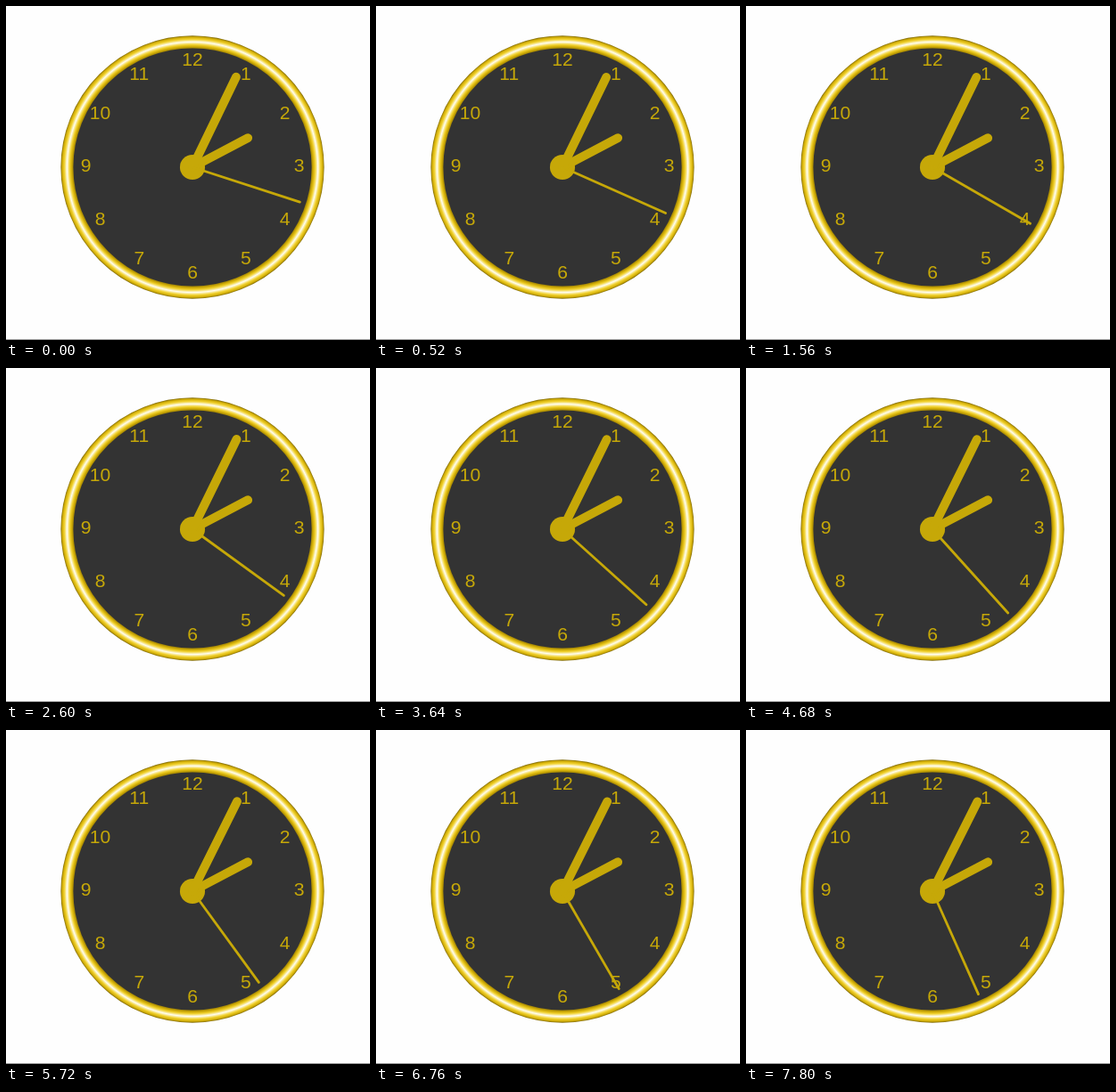
Animation of 408 by 375 pixels, one loop 8000 ms. Source, as an HTML page with a canvas:

```html
<!DOCTYPE html>
<html lang="en">
<head>
<meta charset="utf-8">
<title>Gold clock</title>
<style>
  html, body { margin: 0; width: 100%; height: 100%; overflow: hidden; background: #fefefe; }
  canvas { display: block; }
</style>
</head>
<body>
<canvas id="stage" width="408" height="375"></canvas>
<script>
const ctx = document.getElementById('stage').getContext('2d');
const LOOP = 8000, TICK = 1040, FIRST_TICK = 520;
const CX = 209, CY = 181, R = 140.6, GOLD = '#c6a808';
const TAU = Math.PI * 2;

const rim = ctx.createRadialGradient(0, 0, R * 0.95, 0, 0, R * 1.05);
[[0, '#a18405'], [0.14, '#d2ae08'], [0.28, '#f0d02c'], [0.5, '#fffdf0'],
 [0.72, '#f0d02c'], [0.88, '#d2ae08'], [1, '#806a08']]
  .forEach(([at, color]) => rim.addColorStop(at, color));

function circle(radius) {
  ctx.beginPath();
  ctx.arc(0, 0, radius, 0, TAU);
}

function drawFace() {
  circle(R);
  ctx.fillStyle = '#333';
  ctx.fill();
  ctx.strokeStyle = rim;
  ctx.lineWidth = R * 0.1;
  ctx.stroke();

  ctx.fillStyle = GOLD;
  circle(R * 0.1);
  ctx.fill();

  ctx.font = `${R * 0.15}px "Liberation Sans", Arial, sans-serif`;
  ctx.textAlign = 'center';
  ctx.textBaseline = 'middle';
  for (let n = 1; n <= 12; n++) {
    const a = n * TAU / 12;
    ctx.fillText(n, Math.sin(a) * R * 0.85, -Math.cos(a) * R * 0.85 - 0.5);
  }
}

function drawHand(turn, length, width) {
  const a = turn * TAU;
  ctx.beginPath();
  ctx.moveTo(0, 0);
  ctx.lineTo(Math.sin(a) * length, -Math.cos(a) * length);
  ctx.strokeStyle = GOLD;
  ctx.lineWidth = width;
  ctx.lineCap = 'round';
  ctx.stroke();
}

function draw(now) {
  const t = now % LOOP;
  const second = 18 + Math.floor((t - FIRST_TICK) / TICK + 1);
  const minute = 4 + second / 60;
  const hour = 2 + minute / 60;

  ctx.fillStyle = '#fefefe';
  ctx.fillRect(0, 0, 408, 375);
  ctx.fillStyle = '#999';
  ctx.fillRect(0, 374, 408, 1);

  ctx.save();
  ctx.translate(CX, CY);
  drawFace();
  drawHand(hour / 12, R * 0.5, R * 0.07);
  drawHand(minute / 60, R * 0.8, R * 0.07);
  drawHand(second / 60, R * 0.9, R * 0.02);
  ctx.restore();
}

const start = performance.now();
function loop() {
  draw(performance.now() - start);
  requestAnimationFrame(loop);
}
loop();
</script>
</body>
</html>
```
